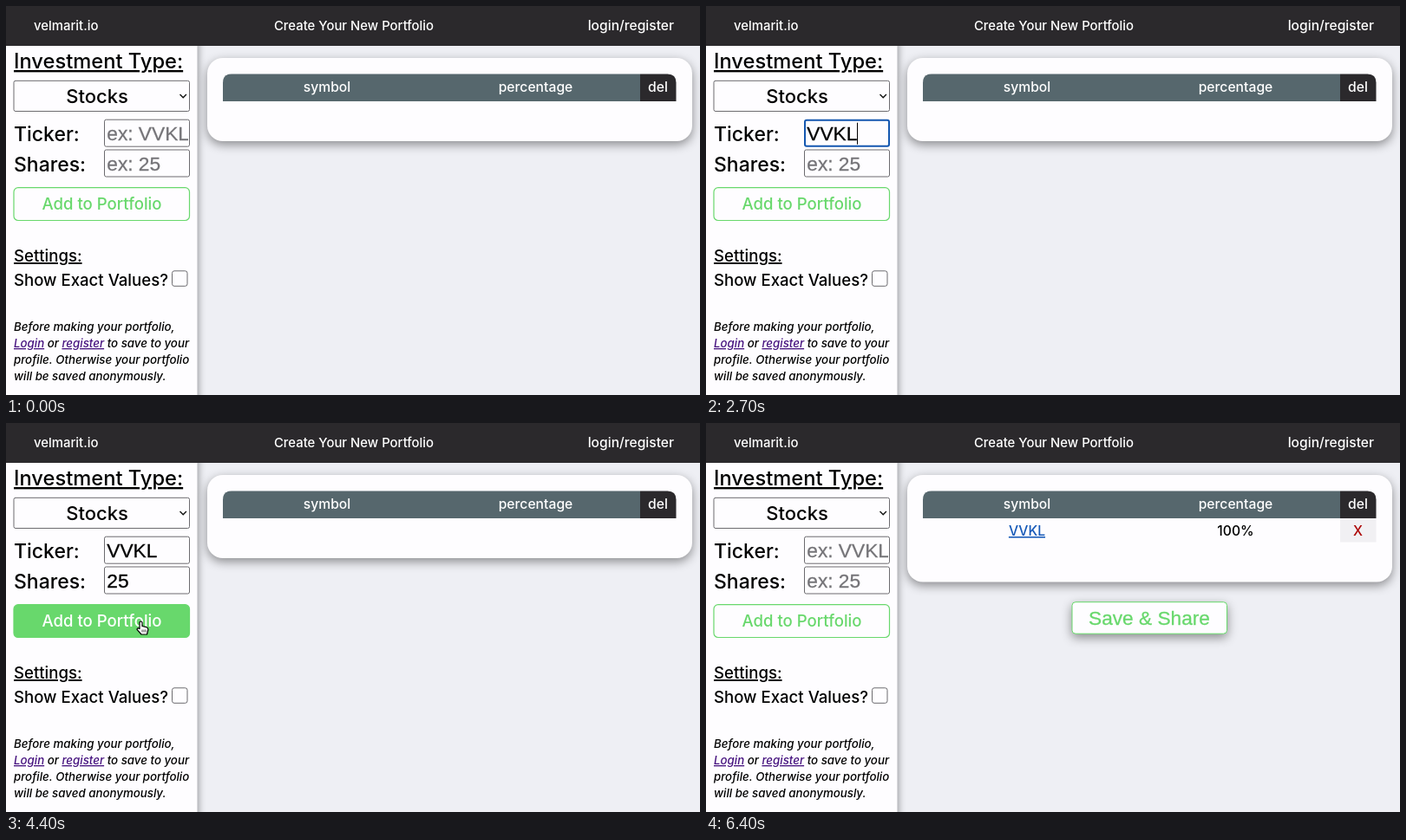
Write an HTML page that moves like this. It is 800 px wide and 449 px high and loops after 6500 ms.

```html
<!DOCTYPE html>
<html lang="en">
<head>
<meta charset="utf-8">
<title>Portfolio builder</title>
<style>
html, body { margin: 0; width: 100%; height: 100%; overflow: hidden; background: #eeeff4; }
svg { display: block; width: 100vw; height: 100vh; font-family: Inter, "Open Sans", sans-serif; font-weight: 500; }
text { white-space: pre; }
.mid { text-anchor: middle; }
.nav { font-size: 14.9px; fill: #fff; }
.big { font-size: 23px; }
.med { font-size: 18.6px; }
.cell { font-size: 15.7px; }
.note { font-size: 13.3px; font-style: italic; }
.arial { font-family: "Liberation Sans", Arial, sans-serif; font-size: 22.7px; font-weight: 400; }
.under { text-decoration: underline; text-decoration-thickness: 1.5px; text-underline-offset: 2px; }
.link { fill: #46137f; text-decoration: underline; }
.field { fill: #fefdff; stroke: #6c6b6f; }
.white { fill: #fefdff; }
.dark { fill: #2b292c; }
.card { filter: drop-shadow(0 4px 6px rgba(0, 0, 0, .42)); }
.side { filter: drop-shadow(1px 0 4px rgba(0, 0, 0, .4)); }
</style>
</head>
<body>
<svg viewBox="0 0 800 449">
  <rect class="white side" y="40" width="220.5" height="420"/>
  <rect class="dark" width="800" height="46"/>
  <text class="nav" x="32" y="28">velmarit.io</text>
  <text class="nav mid" x="401" y="28">Create Your New Portfolio</text>
  <text class="nav" x="770" y="28" text-anchor="end" style="font-size:15.6px">login/register</text>

  <text class="big under" x="9" y="72" style="font-size:23.7px">Investment Type:</text>
  <rect class="field" x="9" y="86.3" width="202.5" height="35.2" rx="2"/>
  <text class="big mid" x="105" y="112" style="font-size:22px">Stocks</text>
  <path d="M200.5 102l3.7 3.7 3.7-3.7" fill="none" stroke="#111" stroke-width="1.4"/>
  <text class="big" x="9" y="156">Ticker:</text>
  <text class="big" x="9" y="191">Shares:</text>
  <g id="ticker" transform="translate(113 130.7)"></g>
  <g id="shares" transform="translate(113 165.5)"></g>

  <rect id="add" x="9" y="209.7" width="202.5" height="37.8" rx="5" stroke="#68d86c" stroke-width="1.2"/>
  <text id="addText" class="med mid" x="110.5" y="235">Add to Portfolio</text>

  <text class="med under" x="9" y="295">Settings:</text>
  <text class="med" x="9" y="322.5">Show Exact Values?</text>
  <rect class="field" x="191.5" y="305.8" width="17.5" height="17.5" rx="2.5"/>
  <text class="note" x="9" y="375">Before making your portfolio,</text>
  <text class="note" x="9" y="394"><tspan class="link">Login</tspan> or <tspan class="link">register</tspan> to save to your</text>
  <text class="note" x="9" y="413">profile. Otherwise your portfolio</text>
  <text class="note" x="9" y="432">will be saved anonymously.</text>

  <rect id="card" class="white card" x="232" y="60" width="559" height="96" rx="18"/>
  <path d="M250 110V88.5q0-10 10-10H731v31.5z" fill="#56676d"/>
  <path class="dark" d="M731 110V78.5h31.5q10 0 10 10v21.5z"/>
  <g class="cell mid" fill="#fff">
    <text x="370" y="99">symbol</text>
    <text x="610.5" y="99">percentage</text>
    <text x="751.5" y="99">del</text>
  </g>
  <g id="row" class="cell mid">
    <rect x="731" y="110" width="41.5" height="27.5" fill="#f1f0f3"/>
    <text x="370" y="130" fill="#1559b8" text-decoration="underline">VVKL</text>
    <text x="610.5" y="130">100%</text>
    <text x="751.5" y="130" fill="#ad0707">X</text>
    <rect class="white card" x="422" y="206.7" width="178.5" height="36.5" rx="4" stroke="#68d86c"/>
    <text class="arial" x="511" y="233" fill="#68d86c" stroke="#68d86c" stroke-width=".3">Save &amp; Share</text>
  </g>

  <path id="arrow" d="M0 0V12.5L2.9 9.9 4.8 14.2 7 13.2 5.1 9H9Z" fill="#000" stroke="#fff" stroke-width=".8"/>
  <g id="hand" stroke="#000" stroke-linejoin="round">
    <path d="M0 1Q1.5-1 3 1V5.5L8 6.7Q10 7.3 9.8 9.5L8.5 15H2L-3 9.3Q-2.5 6.8 0 8.6Z" fill="#fff" stroke-width="1.2"/>
    <path d="M3 9.5v3M5 9.5v3M7 9.5v3" stroke-width=".7"/>
  </g>
</svg>
<script>
const $ = id => document.getElementById(id);
const LOOP = 6500, WORD = "VVKL", COUNT = "25";
const CLICK = 4300, ADDED = 4600;
const wordTimes = [1800, 2000, 2300, 2500], countTimes = [3100, 3300];

// Each pointer trip is a list of [time, x, y]; the pointer is hidden between trips.
const trips = [
  [[100, 642, 300], [700, 341, 428], [1000, 170, 149], [1800, 170, 149]],
  [[3600, 170, 161], [4000, 154, 229], [4700, 154, 229], [4900, 244.5, 269.5], [5400, 244.5, 269.5]]
];

const typed = (word, times, t) => word.slice(0, times.filter(k => t >= k).length);
const show = (el, on) => el.setAttribute("visibility", on ? "visible" : "hidden");

function pointer(t) {
  for (const trip of trips)
    for (let i = 1; i < trip.length; i++) {
      const [t0, x0, y0] = trip[i - 1], [t1, x1, y1] = trip[i];
      if (t >= t0 && t < t1) {
        const k = (t - t0) / (t1 - t0);
        return [x0 + (x1 - x0) * k, y0 + (y1 - y0) * k];
      }
    }
}

function makeInput(id, hint) {
  const g = $(id);
  g.innerHTML = `<rect/><svg width="97" height="31"><text class="arial" x="3.3" y="24.3" stroke-width=".3"/></svg>
    <path d="M0 4v25" stroke="#000"/>`;
  const [box, , caret] = g.children, label = g.querySelector("text");
  return (value, focus) => {
    const inset = focus ? 1 : .5;
    const attrs = { x: inset, y: inset, width: 99 - 2 * inset, height: 32 - 2 * inset, rx: 2,
      fill: "#fefdff", stroke: focus ? "#1457b0" : "#6c6b6f", "stroke-width": focus ? 2 : 1 };
    for (const k in attrs) box.setAttribute(k, attrs[k]);
    const ink = value ? "#000" : "#757478";
    label.textContent = value || hint;
    label.setAttribute("fill", ink);
    label.setAttribute("stroke", ink);
    show(caret, focus);
    const end = value ? label.getComputedTextLength() : 0;
    caret.setAttribute("transform", `translate(${Math.round(3.3 + end) + .5} 0)`);
  };
}

const setTicker = makeInput("ticker", "ex: " + WORD);
const setShares = makeInput("shares", "ex: 25");

function draw(t) {
  const added = t >= ADDED;
  setTicker(added ? "" : typed(WORD, wordTimes, t), t >= 1300 && t < 2800);
  setShares(added ? "" : typed(COUNT, countTimes, t), t >= 2800 && t < CLICK);
  show($("row"), added);
  $("card").setAttribute("height", added ? 123.5 : 96);

  const at = pointer(t);
  const hover = !!at && at[0] > 9 && at[0] < 212 && at[1] > 210 && at[1] < 248 && t > 3500;
  $("add").setAttribute("fill", hover ? "#68d86c" : "#fefdff");
  $("addText").setAttribute("fill", hover ? "#fff" : "#68d86c");
  show($("arrow"), at && !hover);
  show($("hand"), hover);
  if (at) $(hover ? "hand" : "arrow").setAttribute("transform", `translate(${at})`);
}

const start = performance.now();
function tick() {
  const t = (performance.now() - start) % LOOP;
  draw(Math.floor(t / 100) * 100);
  requestAnimationFrame(tick);
}
tick();
</script>
</body>
</html>
```
